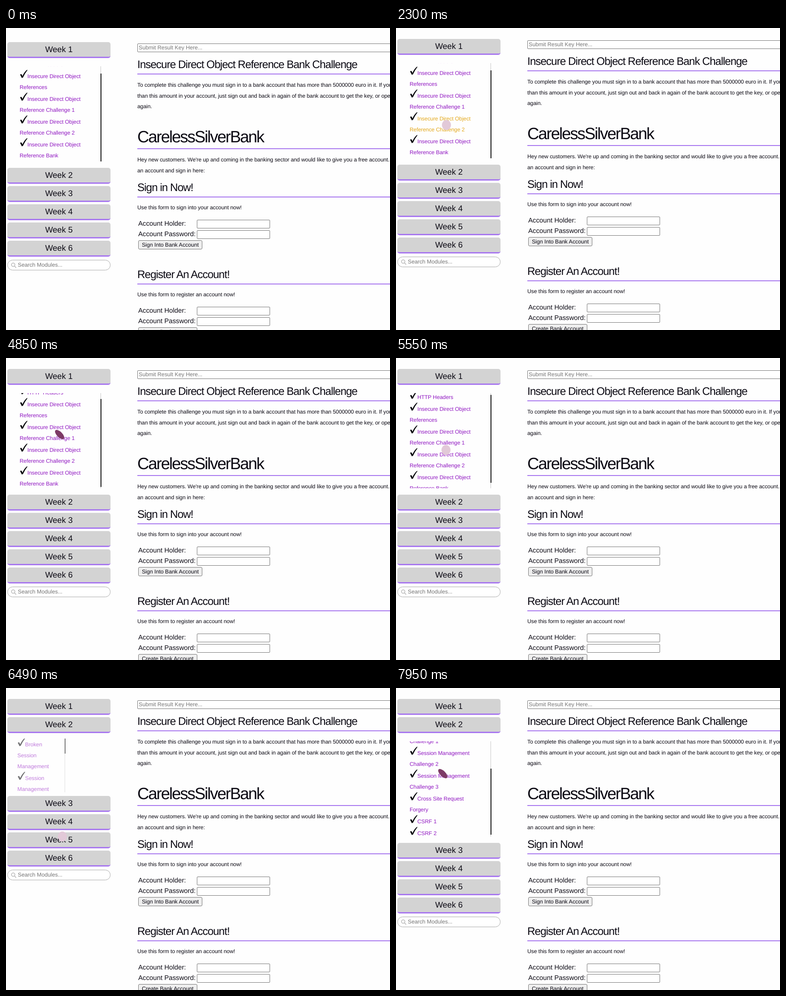
These frames come from a looping animation (845x663 px, 8000 ms). An HTML page:

```html
<!DOCTYPE html>
<html lang="en">
<head>
<meta charset="utf-8">
<title>Bank Challenge</title>
<style>
html, body { margin: 0; width: 100%; height: 100%; overflow: hidden; background: #fefefe; }
body { position: relative; font: 12px "Liberation Sans", Arial, sans-serif; color: #0c0a14; text-rendering: geometricPrecision; }
#page { position: absolute; left: 0; top: 0; width: 845px; height: 760px; }
#side { position: absolute; left: 3px; top: 31px; width: 227px; }
.week { height: 32px; margin-bottom: 5px; border-bottom: 3px solid #a878ef; border-radius: 5px; background: #d3d3d3; text-align: center; font-size: 18px; line-height: 32px; }
.panel { position: relative; overflow: hidden; }
.view { position: absolute; overflow: hidden; }
ul { position: absolute; left: 0; top: -1px; margin: 0; padding: 0 0 1px; list-style: none; }
li { position: relative; padding-top: 2px; line-height: 24px; text-indent: 17px; letter-spacing: -.075px; color: #9119c2; }
li.hot { color: #e3a81c; }
li svg { position: absolute; left: 0; top: -1px; width: 18px; height: 20px; fill: #08080c; }
.track, .thumb { position: absolute; right: 0; }
.track { right: 1px; top: 0; bottom: 0; width: 1px; background: #c8c8c8; }
.thumb { width: 2px; background: #111; }
.search { box-sizing: border-box; height: 23px; margin-top: 7px; padding-left: 22px; border: 1px solid #aaa; border-radius: 12px; background: #fff; font-size: 12.2px; line-height: 21px; color: #757575; position: relative; }
.search svg { position: absolute; left: 7px; top: 5px; width: 12px; height: 12px; fill: none; stroke: #bbb; stroke-width: 1.6; }
.text { position: absolute; line-height: 30px; margin-top: -15px; white-space: nowrap; }
.p { letter-spacing: -.075px; }
.h1 { font-size: 36px; letter-spacing: -2px; }
.h2 { font-size: 24px; letter-spacing: -1px; }
.label { font-size: 14.75px; }
.hint { font-size: 12.2px; color: #757575; }
.rule { position: absolute; left: 289px; right: 0; height: 2px; background: #a878ef; }
.field, .button { position: absolute; box-sizing: border-box; border: 1px solid #767676; border-radius: 2px; background: #fff; }
.button { left: 291px; height: 20px; border-radius: 3px; background: #efefef; padding: 0 7px; line-height: 18px; white-space: nowrap; font-size: 12.1px; }
#cursor { position: absolute; border-radius: 50%; }
#cursor.link { width: 20px; height: 22px; margin-left: -10px; background: #e2c9d8; }
#cursor.hand { width: 26px; height: 12px; margin: 5px 0 0 -2px; background: #7d3a66; transform: rotate(45deg); }
</style>
</head>
<body>
<div id="page"><div id="side"></div></div>
<div id="cursor"></div>
<script>
const LOOP = 8000;
const page = document.getElementById("page");
const side = document.getElementById("side");
const cursor = document.getElementById("cursor");

function add(parent, className, html = "", style = {}, tag = "div") {
  const el = document.createElement(tag);
  el.className = className;
  el.innerHTML = html;
  for (const key in style) el.style[key] = typeof style[key] === "number" ? style[key] + "px" : style[key];
  return parent.appendChild(el);
}

const text = (kind, y, words, left = 289) => add(page, "text " + kind, words, { left, top: y });
const rule = top => add(page, "rule", "", { top });
const field = (left, top, width) => add(page, "field", "", { left, top, width, height: 19 });

// Main column
field(289, 34, 570);
text("hint", 43, "Submit Result Key Here...", 292);
text("h2", 81, "Insecure Direct Object Reference Bank Challenge");
rule(100);
text("p", 125, "To complete this challenge you must sign in to a bank account that has more than 5000000 euro in it. If you have less");
text("p", 148.5, "than this amount in your account, just sign out and back in again of the bank account to get the key, or open the module");
text("p", 172, "again.");
text("h1", 239, "CarelessSilverBank");
rule(264);
text("p", 289, "Hey new customers. We're up and coming in the banking sector and would like to give you a free account.");
text("p", 313, "an account and sign in here:");

function form(y, title, note, action) {
  text("h2", y, title);
  rule(y + 19);
  text("p", y + 43, note);
  text("label", y + 79, "Account Holder:", 291);
  text("label", y + 102, "Account Password:", 291);
  field(420, y + 70, 161);
  field(420, y + 93, 161);
  add(page, "button", action, { top: y + 115 });
}
form(351, "Sign in Now!", "Use this form to sign into your account now!", "Sign Into Bank Account");
form(542, "Register An Account!", "Use this form to register an account now!", "Create Bank Account");

// Sidebar
const CHECK = '<svg viewBox="0 0 18 20"><path d="M1 11.2Q3 9.4 4.6 11L6.2 14.6Q10.4 5.4 16.2.8L17.2 1.6Q11.6 8.6 7.4 17.8L4.8 18.8Z"/></svg>';

function makePanel(items) {
  const box = add(side, "panel");
  const view = add(box, "view");
  const list = add(view, "", "", {}, "ul");
  const links = items.map(name => add(list, "", CHECK + name, {}, "li"));
  add(view, "track");
  return { box, view, list, links, thumb: add(view, "thumb") };
}

const week = n => add(side, "week", "Week " + n);
week(1);
const first = makePanel(["HTTP Headers", "Insecure Direct Object References",
  "Insecure Direct Object Reference Challenge 1", "Insecure Direct Object Reference Challenge 2",
  "Insecure Direct Object Reference Bank"]);
week(2);
const second = makePanel(["Broken Session Management", "Session Management Challenge 1",
  "Session Management Challenge 2", "Session Management Challenge 3",
  "Cross Site Request Forgery", "CSRF 1", "CSRF 2"]);
[3, 4, 5, 6].forEach(week);
add(side, "search", '<svg viewBox="0 0 12 12"><circle cx="4.8" cy="4.8" r="3.8"/><path d="M7.6 7.6L11.4 11.4"/></svg>Search Modules...');

function drawPanel(panel, open, scroll, hot) {
  const { box, view, list, links, thumb } = panel;
  box.style.display = open > 0 ? "" : "none";
  if (open <= 0) return;
  const height = 209 * open, width = 10 + 170 * open;
  box.style.height = 236 * open + "px";
  box.style.opacity = open;
  Object.assign(view.style, {
    left: 15.5 + 11.5 * open + "px", top: 13 * open + "px",
    width: width + "px", height: height + "px"
  });
  list.style.width = Math.max(10, width - 35) + "px";
  list.style.transform = `translateY(${-scroll}px)`;
  const ratio = Math.min(1, height / (list.offsetHeight - 1));
  thumb.style.top = scroll * ratio + "px";
  thumb.style.height = height * ratio + "px";
  links.forEach((link, i) => link.classList.toggle("hot", i === hot));
}

// Timelines: [ms, values...], each held until the next row
const CURSOR = [
  [0, -60, -60, "hand"], [350, 487, 537, "hand"], [430, 472, 321, "hand"],
  [740, 479, 400, "hand"], [816, 380, 440, "hand"], [892, 260, 400, "hand"],
  [968, 205, 290, "hand"], [1044, 202, 160, "hand"], [1120, 202, 94, "hand"],
  [1290, 175, 108, "hand"], [1360, 130, 122, "hand"], [1430, 109, 128, "hand"],
  [1810, 110, 165, "hand"], [1900, 111, 202, "link"], [3140, 107, 157, "hand"],
  [5550, 110, 191, "link"], [5628, 112, 205, "hand"], [5706, 115, 230, "hand"],
  [5784, 118, 260, "hand"], [5862, 121, 288, "hand"], [5940, 123, 307, "link"],
  [6020, 124, 315, "link"], [6638, 118, 290, "link"], [6716, 108, 240, "hand"],
  [6794, 97, 200, "hand"], [6872, 93, 184, "link"], [6950, 93, 178, "link"],
  [7337, 92, 177, "hand"]
];
const PAGE_SCROLL = [[0, 0], [2210, 4], [2300, 7]];
const LIST_SCROLL = [
  [0, 17], [3450, 12], [3525, 4], [3600, 0], [3770, 4], [4090, 8], [4165, 14],
  [4240, 17], [4850, 14], [4930, 9], [5010, 6], [5090, 4]
];
const FIRST_HOT = [[0, -1], [1900, 3], [3140, -1]];
const SECOND_HOT = [[0, -1], [6950, 1], [7337, -1]];

const hold = (rows, t) => rows.findLast(row => row[0] <= t).slice(1);
const swing = p => .5 - Math.cos(Math.PI * Math.min(1, Math.max(0, p))) / 2;

function draw(t) {
  page.style.top = -hold(PAGE_SCROLL, t)[0] + "px";

  const step = 6170 + 78 * Math.floor((t - 6170) / 78);
  const closing = swing((step - 6157) / 200);
  const opening = swing((step - 6157) / 600);
  const scroll = t < 7260 ? 0 : 6 + 9 * Math.floor((t - 7260) / 76.6);
  drawPanel(first, 1 - closing, hold(LIST_SCROLL, t)[0], hold(FIRST_HOT, t)[0]);
  drawPanel(second, opening, scroll, hold(SECOND_HOT, t)[0]);

  const [x, y, kind] = hold(CURSOR, t);
  cursor.className = kind;
  cursor.style.left = x + "px";
  cursor.style.top = y + "px";
}

const start = performance.now();
function tick() {
  draw((performance.now() - start) % LOOP);
  requestAnimationFrame(tick);
}
tick();
</script>
</body>
</html>
```
